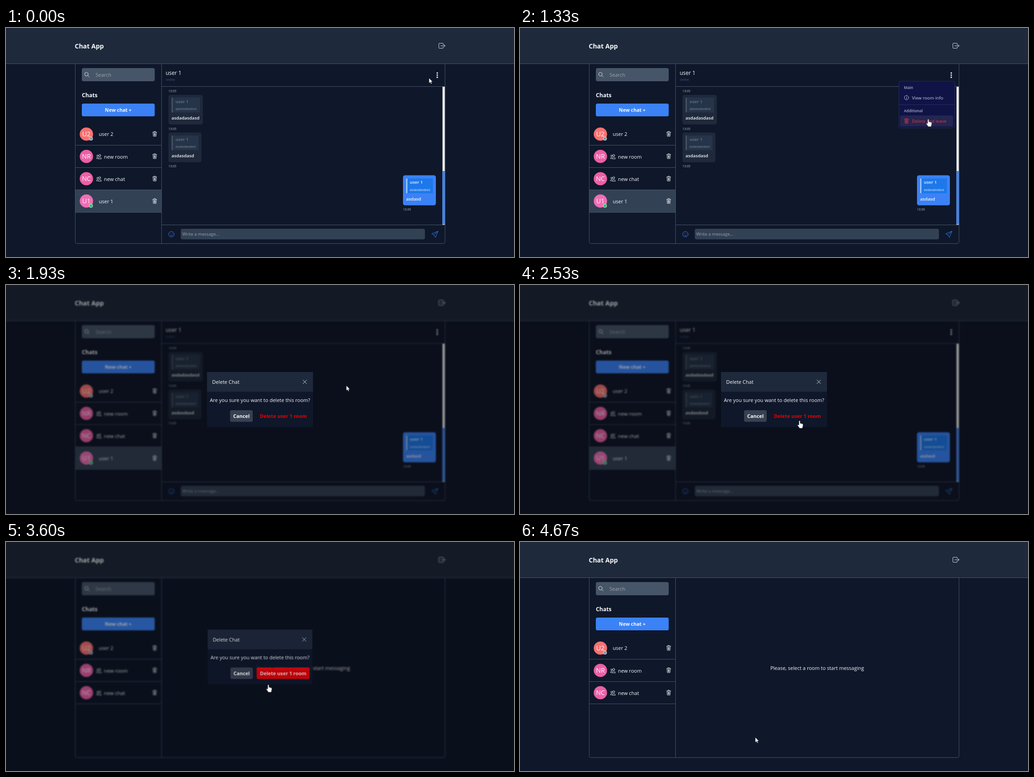
These frames come from a looping animation (1112x503 px, 5470 ms). An HTML page:

```html
<!DOCTYPE html>
<html lang="en">
<head>
<meta charset="utf-8">
<title>Chat room removal</title>
<style>
html, body { margin: 0; width: 100%; height: 100%; overflow: hidden; background: #0f172a; }
svg { display: block; width: 100vw; height: 100vh; font: 11px "Open Sans", "Noto Sans", sans-serif; }
text { fill: #f8fafc; white-space: pre; }
.mid { text-anchor: middle; }
.b { font-weight: 700; }
.hint { fill: #9ca3af; }
.time { font-size: 6.75px; fill: #b6bfcc; }
.name { font-size: 9.4px; font-weight: 700; fill: #5b687b; }
.quote { font-size: 6.7px; fill: #7e8999; }
.msg { font-size: 9.75px; font-weight: 600; }
.mine .name { fill: #c5dcfb; }
.mine .quote { fill: #dbeafe; }
.ava { font-size: 14.2px; font-weight: 500; text-anchor: middle; }
.head { font-size: 8.3px; font-weight: 600; fill: #a9adc6; }
.item { font-size: 9.75px; fill: #cdd0e4; }
.line { stroke: #475569; fill: none; }
.icon { stroke: #e8edf3; stroke-width: .9; fill: none; stroke-linecap: round; stroke-linejoin: round; }
.blue { stroke: #3b82f6; }
.red { stroke: #e0384a; }

#app, #room, #empty, #menu, #hover, #dim, #modal, #fill, #cursor, #arrow, #hand {
  animation: 5470ms linear infinite;
}
#app { animation-name: blur; }
#room { animation-name: room; animation-timing-function: step-end; }
#empty { animation-name: empty; animation-timing-function: step-end; }
#menu { animation-name: menu; }
#hover { animation-name: hover; animation-timing-function: step-end; }
#dim { animation-name: dim; }
#modal { animation-name: modal; transform-origin: 556px 251.5px; }
#fill { animation-name: fill; }
#cursor { animation-name: move; }
#arrow { animation-name: arrow; animation-timing-function: step-end; }
#hand { animation-name: hand; animation-timing-function: step-end; }

@keyframes blur {
  0%, 31.7% { filter: blur(0); }
  34.19%, 65.8% { filter: blur(1.5px); }
  69.3%, 100% { filter: blur(0); }
}
@keyframes room { 0% { opacity: 1; } 65.81%, 100% { opacity: 0; } }
@keyframes empty { 0% { opacity: 0; } 65.81%, 100% { opacity: 1; } }
@keyframes menu {
  0%, 16.5% { opacity: 0; }
  19.4%, 30.2% { opacity: 1; }
  31.63% { opacity: .13; }
  32.5%, 100% { opacity: 0; }
}
@keyframes hover { 0% { opacity: 0; } 22.5% { opacity: 1; } 33%, 100% { opacity: 0; } }
@keyframes dim {
  0%, 30% { opacity: 0; }
  31.63% { opacity: .11; }
  34.19%, 65.5% { opacity: .36; }
  69.47% { opacity: .1; }
  70.75%, 100% { opacity: 0; }
}
@keyframes modal {
  0%, 29.6% { opacity: 0; transform: translateY(7px) scale(.9); }
  31.63% { opacity: .7; transform: translateY(3px) scale(.96); }
  32.91%, 65.5% { opacity: 1; transform: none; }
  68.19%, 100% { opacity: 0; transform: translateY(7px) scale(.9); }
}
@keyframes fill {
  0%, 51.2% { opacity: 0; }
  54%, 65.7% { opacity: 1; }
  66.5%, 100% { opacity: 0; }
}
@keyframes move {
  0%, .5% { transform: translate(926px, 110px); }
  3.66% { transform: translate(935px, 102px); }
  6.5% { transform: translate(945px, 93px); }
  9.69%, 11.5% { transform: translate(947.5px, 97px); }
  12.25%, 16.5% { transform: translate(947.5px, 98.5px); }
  20% { transform: translate(926px, 140px); }
  24.31% { transform: translate(893.7px, 200px); }
  26.87%, 31.63% { transform: translate(893.2px, 204px); }
  34.19% { transform: translate(800px, 214px); }
  40.22% { transform: translate(501px, 251px); }
  43.88% { transform: translate(646px, 338px); }
  46.25% { transform: translate(612px, 298px); }
  51.19% { transform: translate(608px, 268px); }
  54% { transform: translate(606px, 287px); }
  58.5%, 65% { transform: translate(604.5px, 295px); }
  69.47% { transform: translate(442.5px, 393px); }
  75.5% { transform: translate(194px, 356px); }
  80.5% { transform: translate(330px, 447px); }
  85.37%, 100% { transform: translate(515px, 429px); }
}
@keyframes arrow {
  0% { opacity: 1; } 7.31% { opacity: 0; } 18.28% { opacity: 1; } 21.94% { opacity: 0; }
  32.91% { opacity: 1; } 45.7% { opacity: 0; } 66.5%, 100% { opacity: 1; }
}
@keyframes hand {
  0% { opacity: 0; } 7.31% { opacity: 1; } 18.28% { opacity: 0; } 21.94% { opacity: 1; }
  32.91% { opacity: 0; } 45.7% { opacity: 1; } 66.5%, 100% { opacity: 0; }
}
</style>
</head>
<body>
<svg viewBox="0 0 1112 503" preserveAspectRatio="none">
  <defs>
    <g id="trash">
      <path d="M.5 2.4H9.5M3.3 2.2V.7H6.7V2.2M1.3 2.6L2 11.4H8L8.7 2.6M3.6 4.4L3.8 9.6M5 4.4V9.6M6.4 4.4L6.2 9.6"/>
    </g>
    <g id="people">
      <circle cx="7.6" cy="2.9" r="2.2"/>
      <circle cx="2.9" cy="3.6" r="1.7"/>
      <path d="M4.2 10C4.2 5.6 11.2 5.6 11.2 10ZM4 6.7C1.6 6.6 .5 8 .5 9.7H3"/>
    </g>
  </defs>

  <g id="app">
    <rect x="-20" y="-20" width="1152" height="543" fill="#0f172a"/>
    <rect x="-20" y="-20" width="1152" height="98" fill="#1e293b"/>
    <path class="line" d="M-20 78.5H1132"/>
    <text class="b" x="150.5" y="45" font-size="14">Chat App</text>
    <path class="icon" transform="translate(947 33)" d="M10 3.5V1.5Q10 .5 9 .5H1.5Q.5 .5 .5 1.5V10.5Q.5 11.5 1.5 11.5H9Q10 11.5 10 10.5V8.5M4.5 6H14.2M11.5 3.3L14.2 6L11.5 8.7"/>
    <path class="line" d="M151.5 79V469.5Q151.5 473.5 155.5 473.5H957Q961 473.5 961 469.5V79M340.5 79V473"/>

    <rect x="166" y="88" width="159.5" height="29" rx="4" fill="#475569"/>
    <g class="icon"><circle cx="176" cy="101.5" r="3.8"/><path d="M179 104.5L182 107.5"/></g>
    <text class="hint" x="196" y="107">Search</text>
    <text class="b" x="166" y="152" font-size="12.1">Chats</text>
    <rect x="166" y="166" width="159.5" height="28" rx="3.5" fill="#3b82f6"/>
    <text class="b mid" x="245.7" y="184.3" font-size="10.5">New chat +</text>

    <path class="line" d="M152 257.5H340M152 306.5H340M152 355.5H340"/>
    <circle cx="176" cy="233" r="14.6" fill="#f87171"/>
    <text class="ava" x="176" y="238.3">U2</text>
    <circle cx="186" cy="243" r="3.8" fill="#8494a8" stroke="#e2e8f0"/>
    <text x="203" y="237.3">user 2</text>
    <circle cx="176" cy="282" r="14.6" fill="#ec5fa6"/>
    <text class="ava" x="176" y="287.3">NR</text>
    <text x="214.5" y="286.5">new room</text>
    <circle cx="176" cy="331" r="14.6" fill="#ec5fa6"/>
    <text class="ava" x="176" y="336.3">NC</text>
    <text x="214.5" y="335.6">new chat</text>
    <g class="icon">
      <use href="#trash" x="320.5" y="226.5"/>
      <use href="#trash" x="320.5" y="275.5"/>
      <use href="#trash" x="320.5" y="324.7"/>
      <use href="#people" x="197.5" y="277"/>
      <use href="#people" x="197.5" y="326"/>
    </g>

    <g id="room">
      <rect x="152" y="356" width="188" height="49" fill="#334155"/>
      <path class="line" d="M152 405H340"/>
      <circle cx="176" cy="380" r="14.6" fill="#f06eb4"/>
      <text class="ava" x="176" y="385.3">U1</text>
      <circle cx="186" cy="390.5" r="3.8" fill="#22c55e" stroke="#e2e8f0"/>
      <text x="203" y="384.8">user 1</text>
      <g class="icon"><use href="#trash" x="320.5" y="374"/></g>

      <text x="349.5" y="102.8" font-size="12">user 1</text>
      <text x="350" y="116" font-size="6.9" style="fill:#475792">online</text>
      <g fill="#fff">
        <circle cx="944" cy="98.8" r="1.6"/><circle cx="944" cy="103.5" r="1.6"/><circle cx="944" cy="108.2" r="1.6"/>
      </g>
      <path class="line" d="M341 128.5H961M341 432.5H961"/>
      <rect x="955.5" y="129" width="5" height="303" fill="#f1f1f1"/>
      <rect x="955.5" y="314" width="5" height="117" fill="#3b82f6"/>

      <text class="time" x="355.7" y="140.6">13:05</text>
      <rect x="355.5" y="147" width="75.5" height="65" rx="4.5" fill="#1e293b"/>
      <rect x="362.5" y="153" width="62" height="32.5" rx="1.5" fill="#263449"/>
      <rect x="362.5" y="153" width="2.6" height="32.5" rx="1" fill="#475569"/>
      <text class="name" x="371" y="165">user 1</text>
      <text class="quote" x="371" y="180.3">qweasdasdasd</text>
      <text class="msg" x="362.3" y="201.4">asdadasdasd</text>
      <text class="time" x="355.7" y="223.5">13:05</text>

      <rect x="355.5" y="229.5" width="72.5" height="65.5" rx="4.5" fill="#1e293b"/>
      <rect x="362.5" y="236" width="59" height="32.5" rx="1.5" fill="#263449"/>
      <rect x="362.5" y="236" width="2.6" height="32.5" rx="1" fill="#475569"/>
      <text class="name" x="371" y="247.8">user 1</text>
      <text class="quote" x="371" y="263">asdasdasdasd</text>
      <text class="msg" x="362.3" y="284.3">asdasdasd</text>
      <text class="time" x="355.7" y="306.2">13:05</text>

      <g class="mine">
        <rect x="869" y="323.5" width="72" height="66" rx="4.5" fill="#3b82f6"/>
        <rect x="876" y="330.5" width="58.5" height="32.5" rx="1.5" fill="#1d78ea"/>
        <rect x="876" y="330.5" width="2.6" height="32.5" rx="1" fill="#a9cdfb"/>
        <text class="name" x="884" y="342.3">user 1</text>
        <text class="quote" x="884" y="357.5">asdasdasdasd</text>
        <text class="msg" x="875.7" y="378.6">asdasd</text>
        <text class="time" x="869" y="400.6">13:09</text>
      </g>

      <g class="icon blue">
        <circle cx="362" cy="453" r="6"/>
        <path d="M359.2 454.8Q362 458 364.8 454.8M360 450.8V451.4M364 450.8V451.4"/>
        <path d="M945.3 446.5L931.8 452L936.5 454.8L939.8 459.8ZM945.3 446.5L936.5 454.8"/>
      </g>
      <rect x="382.5" y="441" width="534.5" height="23.3" rx="4" fill="#334155"/>
      <text class="hint" x="386" y="455.6" font-size="9.55">Write a message...</text>
    </g>

    <text id="empty" class="mid" x="650.5" y="281">Please, select a room to start messaging</text>

    <g id="menu">
      <rect x="829.5" y="117" width="122" height="102.5" rx="3.5" fill="#0f1346" stroke="#262b62"/>
      <text class="head" x="840.5" y="133.8">Main</text>
      <g class="icon" style="stroke:#cdd0e4">
        <circle cx="846" cy="153" r="4.7"/><path d="M846 152.4V155.6M846 150.5V150.6"/>
      </g>
      <text class="item" x="858" y="156.8">View room info</text>
      <path d="M830 168.3H951" stroke="#2a2f64"/>
      <text class="head" x="840.5" y="185.3">Additional</text>
      <rect id="hover" x="832" y="192" width="116" height="24.5" rx="3" fill="#23264f"/>
      <g class="icon red"><use href="#trash" x="841" y="198"/></g>
      <text class="item" x="858" y="208" style="fill:#e0384a">Delete and leave</text>
    </g>
  </g>

  <rect id="dim" width="1112" height="503"/>

  <g id="modal">
    <rect x="440" y="191" width="232" height="121" fill="#0f172a"/>
    <rect x="440" y="191" width="232" height="43.5" fill="#1e293b"/>
    <text x="451.3" y="217.4">Delete Chat</text>
    <path class="icon" d="M650 208.7L658 216.7M658 208.7L650 216.7"/>
    <text class="mid" x="556" y="256.6">Are you sure you want to delete this room?</text>
    <rect x="490.5" y="275" width="49.5" height="25.5" rx="3.5" fill="#374151"/>
    <text class="b mid" x="515.3" y="292" font-size="10.9">Cancel</text>
    <text class="b mid" x="607.3" y="292" font-size="10.9" style="fill:#e80000">Delete user 1 room</text>
    <g id="fill">
      <rect x="548.5" y="275" width="117.5" height="25.5" rx="3.5" fill="#f00"/>
      <text class="b mid" x="607.3" y="292" font-size="10.9">Delete user 1 room</text>
    </g>
  </g>

  <g id="cursor" fill="#fff" stroke="#0b0f18" stroke-width=".6" stroke-linejoin="round">
    <path id="arrow" d="M0 0V11.3L2.6 8.9L4.4 12.8L6.2 12L4.5 8.2H8Z"/>
    <path id="hand" d="M-1.4 1.4C-1.4 -.3 1.3 -.3 1.3 1.4V5.7L6 6.8Q8 7.4 7.7 9.5L7 13.5L6.2 16.8H0L-4.3 10.6C-4.8 9 -3 8 -1.4 10Z"/>
  </g>
</svg>
</body>
</html>
```
